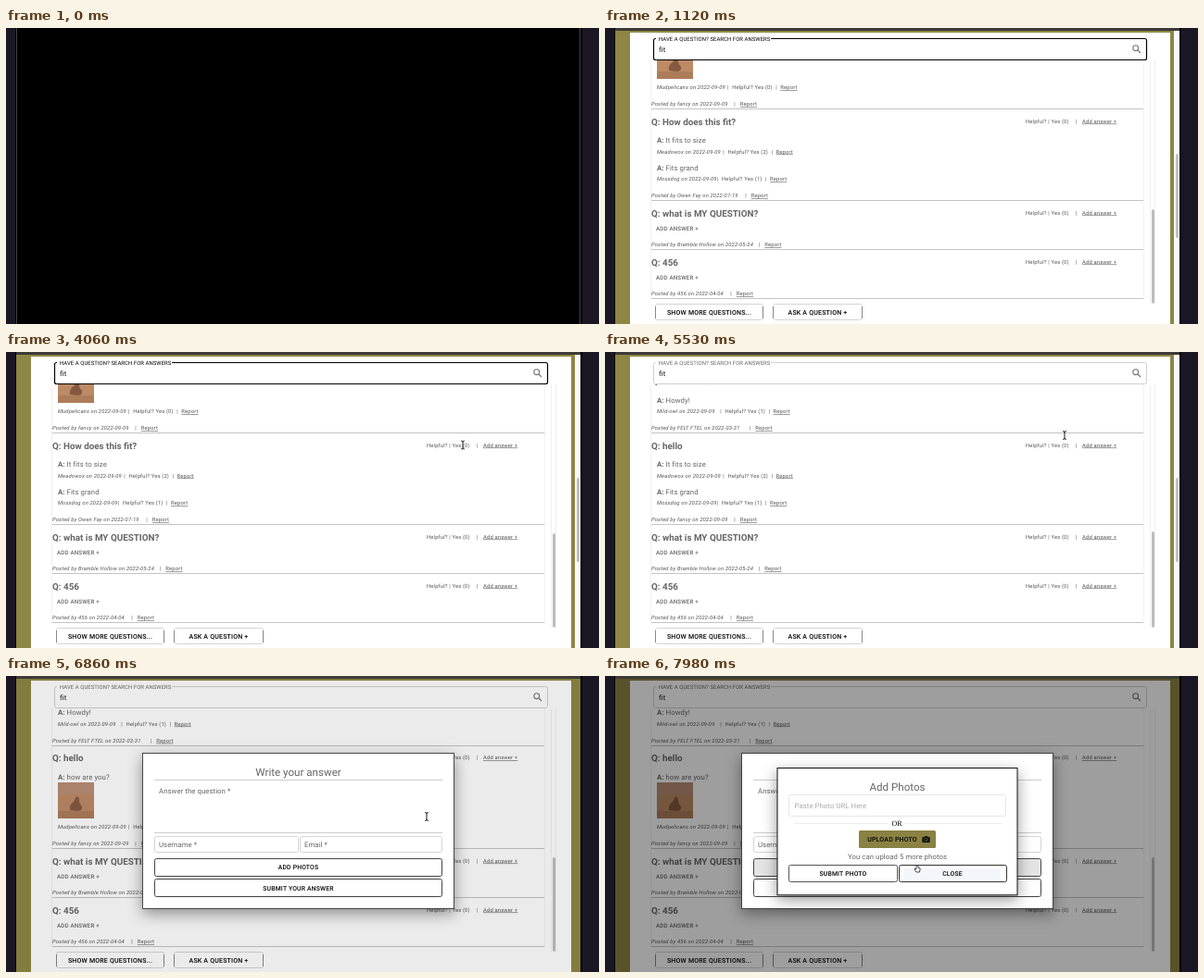
An HTML page for the animation above (8000 ms loop, 640 px wide and 320 px high).

```html
<!DOCTYPE html>
<html lang="en">
<head>
<meta charset="utf-8">
<title>Questions and answers</title>
<style>
html, body { margin: 0; width: 100%; height: 100%; overflow: hidden; background: #000; }
svg { display: block; width: 640px; height: 320px; font-family: Roboto, sans-serif; text-rendering: geometricPrecision; }
text { white-space: pre; }
.title { font: 700 9.84px Roboto, sans-serif; fill: #666; }
.body { font-size: 7.75px; letter-spacing: .0094em; fill: #666; }
.meta { font-size: 5.8px; letter-spacing: .03em; fill: #555; }
.by { font-style: italic; }
.link { text-decoration: underline; }
.small { font-weight: 500; font-size: 6.2px; letter-spacing: .0286em; }
.btn { font-weight: 500; font-size: 7px; letter-spacing: .0286em; }
.act { font-weight: 500; font-size: 6.8px; letter-spacing: .0286em; text-anchor: middle; }
.head { font-size: 11.6px; fill: #666; text-anchor: middle; }
.label { font-size: 5.95px; letter-spacing: .0094em; }
.shadow { filter: drop-shadow(0 5px 8px rgba(0, 0, 0, .4)); }
</style>
</head>
<body>
<svg id="stage" viewBox="0 0 640 320"></svg>
<script>
const text = (x, y, cls, s, extra = '') => `<text x="${x}" y="${y}" class="${cls}" ${extra}>${s}</text>`;
const rect = (x, y, w, h, fill, extra = '') =>
  `<rect x="${x}" y="${y}" width="${w}" height="${h}" fill="${fill}" ${extra}/>`;
const line = (x1, y1, x2, y2, color, w = 1) =>
  `<path d="M${x1} ${y1}L${x2} ${y2}" stroke="${color}" stroke-width="${w}"/>`;
const box = (x, y, w, h, color, sw = 1) =>
  rect(x, y, w, h, 'none', `rx="2" stroke="${color}" stroke-width="${sw}"`);
const pill = (x, w, s) => box(x, 298.5, w, 17, '#d5d5d5') +
  line(x, 301, x, 314, '#888') + line(x + w, 301, x + w, 314, '#888') +
  `<text x="${x + w / 2}" y="309.7" class="btn" text-anchor="middle">${s}</text>`;

function photo(kind, y) {
  if (kind === 'bird') return `<g transform="translate(56 ${y})">` +
    rect(0, 0, 39, 39, '#bd8a66') + rect(0, 0, 39, 13, '#b98d74') + rect(0, 31, 39, 8, '#ad7d5a') +
    '<path d="M13 30Q12 24 17 21L20 15L23 17Q22 22 26 26Q27 30 22 31Z" fill="#85593f"/></g>';
  let s = rect(0, 0, 39, 39, '#29231f');
  for (let i = 0; i < 46; i++) {
    const x = i * 17.3 % 36 + 1, py = i * 10.7 % 34 + 3;
    s += `<circle cx="${x}" cy="${py}" r="${.6 + i % 3 * .3}" fill="${['#8d7953', '#6a5546', '#a8946c'][i % 3]}"/>`;
  }
  return `<g transform="translate(56 ${y})">${s}</g>`;
}

// An answer is [words, author, x of first divider, votes, photo].
const size = ['It fits to size', 'Meadowox', 128, 2];
const grand = ['Fits grand', 'Mossdog', 121.5, 1];
const bird = ['how are you?', 'Mudpelicans', 132.7, 0, 'bird'];
const ask = (title, yes, by, bar, answers = [], more) => ({ title, yes, by, bar, answers, more });
const first = ask('question', 8, 'RelentlessInquirers on 2021-11-29', 186.5,
  [['Good answer', 'Noah Brill', 132.7, 4], ['Depends', 'KD', 107.5, 3]], true);
const genie = ask('Could I get this color if I had a personal genie?', 2, 'Moss on 2022-09-06', 138.5,
  [['Yes you can', 'Trader', 116.5, 1, 'flowers']]);
const cow = ask('cow', 1, 'Moss on 2022-09-05', 138.5);
const felt = ask('FELT FTEL?', 0, 'FELT FTEL on 2022-03-31', 156.5, [['Howdy!', 'Mild-owl', 125, 1]]);
const hello = ask('hello', 0, 'fancy on 2022-09-09', 140, [bird]);
const stale = { ...hello, answers: [size, grand] };
const fits = ask('How does this fit?', 0, 'Owen Fay on 2022-07-19', 152, [size, grand]);
const mine = ask('what is MY QUESTION?', 0, 'Bramble Hollow on 2022-05-24', 166.5);
const digits = ask('456', 0, '456 on 2022-04-04', 136);

function block(q, y) {
  let s = text(50, y + 17.3, 'title', 'Q: ' + q.title) +
    text(454, y + 15, 'meta', `Helpful? | Yes (${q.yes})`) + text(507.5, y + 15, 'meta', '|') +
    text(515, y + 15, 'meta link', 'Add answer +');
  let end = y + 19;
  for (const [words, who, bar, votes, pic] of q.answers) {
    s += text(56, end + 17.6, 'body', `<tspan font-weight="700">A:</tspan> ${words}`);
    if (pic) { s += photo(pic, Math.round(end + 20.5)); end += 42; }
    const m = end + 29;
    s += text(56, m, 'meta by', who + ' on 2022-09-09') + text(bar - .7, m, 'meta', '|') +
      text(bar + 4.5, m, 'meta', `Helpful? Yes (${votes})`) +
      text(bar + 51.6, m, 'meta', '|') + text(bar + 56.6, m, 'meta link', 'Report');
    end += 29.5;
  }
  if (!q.answers.length) s += text(55, y + 32.6, 'small', 'ADD ANSWER +', 'fill="#666"');
  if (q.more) s += text(57, y + 95.8, 'small', 'LOAD MORE ANSWERS...');
  const h = q.answers.length ? end - y + (q.more ? 35.5 : 21) : 53;
  const rule = Math.floor(y + h) + .5;
  s += text(50, y + h - 3.3, 'meta by', 'Posted by ' + q.by) + text(q.bar - .7, y + h - 3.3, 'meta', '|') +
    text(q.bar + 5.8, y + h - 3.3, 'meta link', 'Report') +
    line(50, rule, 581.5, rule, '#c4c4c4') +
    line(49.5, y, 49.5, rule, '#f0f0f0') + line(581.5, y, 581.5, rule, '#f4f4f4');
  return [s, h];
}

// Stacks questions so that the last one ends at the given height.
function stack(list, bottom) {
  const heights = list.map(q => block(q, 0)[1]);
  let y = bottom - heights.reduce((a, b) => a + b, 0);
  const top = y;
  const art = list.map((q, i) => { const s = block(q, y)[0]; y += heights[i]; return s; }).join('');
  return { art, top };
}
const BOTTOM = 292.5;
const all = stack([first, genie, cow, felt, hello, fits, mine, digits], BOTTOM);
const sorted = stack([felt, stale, mine, digits], BOTTOM);
const loaded = stack([felt, hello, mine, digits], BOTTOM);
const START = Math.round(35 - all.top);

const field = (id, color, width, ink) => `<g id="${id}">
  <path d="M55 11.5H54.5Q52.5 11.5 52.5 13.5V32.5Q52.5 34.5 54.5 34.5H582.5Q584.5 34.5 584.5 32.5V13.5Q584.5 11.5 582.5 11.5H179"
    fill="none" stroke="${color}" stroke-width="${width}"/>` +
  text(58, 13.7, 'label', 'HAVE A QUESTION? SEARCH FOR ANSWERS', `fill="${ink}"`) + '</g>';

const answerForm = rect(147.5, 83.5, 336, 168, '#fff', 'stroke="#222" stroke-width=".8" class="shadow"') +
  text(315.5, 108.3, 'head', 'Write your answer') +
  line(160, 112.5, 471, 112.5, '#ccc') + line(160, 169.5, 471, 169.5, '#ccc') +
  text(165, 126.8, 'body', 'Answer the question *') +
  box(160.5, 173.5, 155, 17, '#d4d4d4') + text(165, 185, 'body', 'Username *') +
  box(317.5, 173.5, 153, 17, '#d4d4d4') + text(322, 185, 'body', 'Email *') +
  `<g id="addPhotos">${box(160.5, 197.5, 310, 19, '#444')}</g>` + text(315.5, 209.2, 'act', 'ADD PHOTOS') +
  box(160.5, 219.5, 310, 19, '#444') + text(315.5, 231.6, 'act', 'SUBMIT YOUR ANSWER');

const photoForm = rect(186, 99.5, 259, 137.3, '#fff', 'stroke="#111" stroke-width="1" class="shadow"') +
  text(315.5, 124, 'head', 'Add Photos') +
  box(198.5, 128.5, 234, 23, '#e6e6e6') + text(204.5, 143, 'body', 'Paste Photo URL Here', 'style="fill:#aaa"') +
  line(204, 159.5, 306, 159.5, '#eee') + line(324, 159.5, 428, 159.5, '#eee') +
  text(315, 162.3, '', 'OR', 'style="font:8px Liberation Serif,serif" text-anchor="middle"') +
  rect(274, 167, 83, 19, '#8a8143', 'rx="1.5"') + text(310, 179, 'btn', 'UPLOAD PHOTO', 'text-anchor="middle"') +
  '<path d="M342.5 174.3H344.5L345.4 173.2H347.8L348.7 174.3H350.5V180H342.5Z"/>' +
  '<circle cx="346.5" cy="177" r="1.7" fill="none" stroke="#8a8143" stroke-width=".8"/>' +
  text(315.5, 198, 'body', 'You can upload 5 more photos', 'text-anchor="middle"') +
  box(198.5, 204.5, 117, 18, '#555') + text(257, 216, 'act', 'SUBMIT PHOTO') +
  box(317.5, 204.5, 116, 18, '#333') + rect(322, 208, 105, 12, '#f3f7fb', 'id="hover"') +
  text(375, 216, 'act', 'CLOSE');

const stage = document.getElementById('stage');
stage.innerHTML = `<clipPath id="view"><rect x="48" y="35" width="548" height="263"/></clipPath>` +
  rect(0, 0, 640, 320, '#000') + rect(0, 0, 10, 320, '#1a1623') + rect(622, 0, 18, 320, '#1a1623') +
  line(11.5, 0, 11.5, 320, '#444') + line(619.5, 0, 619.5, 320, '#444') +
  '<g id="page">' + rect(11, 0, 609, 3, '#3d3a38') + rect(11, 3, 609, 317, '#8d8644') +
  rect(27, 5, 583, 315, '#fff') +
  '<g id="bar">' + rect(614, 3, 6, 317, '#fafafa') + rect(616, 136, 3, 91, '#c1c1c1', 'rx="1.5"') + '</g>' +
  '<g clip-path="url(#view)">' +
  `<g id="all">${all.art}</g><g id="sorted">${sorted.art}</g><g id="loaded">${loaded.art}</g>` +
  line(588.5, 35, 588.5, 298, '#f0f0f0') + line(593.5, 35, 593.5, 298, '#f0f0f0') + '</g>' +
  rect(590, 36, 3, 102, '#bdbdbd', 'rx="1.5" id="thumb"') +
  field('focus', '#000', 1.2, '#000') + field('blur', '#d0d0d0', 1, '#666') +
  '<text id="query" x="58" y="26" class="body" style="fill:#111"></text>' + rect(64.4, 18, .8, 9.5, '#000', 'id="caret"') +
  '<path d="M575 24L578 27" stroke="#777" stroke-width="1.3"/><circle cx="572.7" cy="21.7" r="2.9" fill="none" stroke="#777" stroke-width="1.1"/>' +
  pill(54.5, 116, 'SHOW MORE QUESTIONS...') + pill(181.5, 96, 'ASK A QUESTION +') +
  rect(11, 3, 609, 317, '#000', 'id="shade"') +
  `<g id="form">${answerForm}</g><g id="photos">${photoForm}</g><g id="mouse">` +
  '<path id="beam" d="M-1.8 -4.5Q0 -4.5 0 -3Q0 -4.5 1.8 -4.5M0 -3V3M-1.8 4.5Q0 4.5 0 3Q0 4.5 1.8 4.5" fill="none" stroke="#000" stroke-width=".9"/>' +
  '<path id="arrow" d="M0 0V8.5L2 6.7L3.4 9.8L4.7 9.2L3.4 6.2H6Z" stroke="#fff" stroke-width=".5"/>' +
  '<path id="hand" d="M-1 -3V1L-2.5 0L-3 1L-1 4H2.5L3.2 0L1 -.8V-3Q0 -4 -1 -3Z" fill="#fff" stroke="#000" stroke-width=".7"/>' +
  '</g></g>';

const el = {};
stage.querySelectorAll('[id]').forEach(n => el[n.id] = n);
const show = (id, on) => el[id].setAttribute('visibility', on ? 'inherit' : 'hidden');
const clamp = v => Math.max(0, Math.min(1, v));

// Pointer path: time, x, y
const path = [[2730, 73, 31], [3080, 73, 31], [3300, 235, 52], [3550, 480, 84], [3700, 563, 97], [3850, 497, 99],
  [4060, 493, 100.5], [5460, 493, 100.5], [5530, 496, 90], [5950, 533, 89], [6720, 533, 89], [6860, 454, 152],
  [7210, 316, 207], [7700, 316, 207], [7980, 337, 208]];
function pointer(t) {
  const i = path.findIndex(p => p[0] > t);
  if (i < 1) return path[i ? path.length - 1 : 0].slice(1);
  const [a, b] = [path[i - 1], path[i]], k = (t - a[0]) / (b[0] - a[0]);
  return [a[1] + (b[1] - a[1]) * k, a[2] + (b[2] - a[2]) * k];
}

function draw(ms) {
  const t = Math.floor(ms / 70) * 70;
  show('page', t >= 70);

  el.query.textContent = 'fit'.slice(0, t < 280 ? 1 : t < 420 ? 2 : 3);
  el.caret.setAttribute('x', t < 280 ? 60.4 : t < 420 ? 62.3 : 64.4);
  show('caret', t < 840 || t < 3360 && Math.floor(t / 420) % 2);
  show('focus', t < 4270);
  show('blur', t >= 4270);

  const k = clamp((t - 630) / 350), scroll = k * k * (3 - 2 * k);
  el.all.setAttribute('transform', `translate(0 ${START * (1 - scroll)})`);
  show('all', t < 4970);
  show('sorted', t >= 4970 && t < 5600);
  show('loaded', t >= 5600);
  const short = t >= 4970 && t < 5600 ? 2 : 0;
  el.thumb.setAttribute('y', 36 + 160 * scroll - short);
  el.thumb.setAttribute('height', 101.7 + short);

  const a = clamp((t - 6160) / 280), b = clamp((t - 7280) / 280);
  show('bar', t < 6230);
  el.shade.setAttribute('opacity', .08 * a + .3 * b);
  el.form.setAttribute('opacity', a);
  el.photos.setAttribute('opacity', b);
  el.addPhotos.firstChild.setAttribute('fill', t >= 7140 ? '#e4e4e4' : 'none');
  show('hover', t >= 7840);

  const [x, y] = pointer(t);
  const hand = t >= 5880 && t < 6230 || t >= 7140;
  const beam = t < 3220 || t >= 3780 && t < 5600 || t >= 6860 && t < 7000;
  el.mouse.setAttribute('transform', `translate(${x} ${y})`);
  show('mouse', t >= 2730);
  show('hand', hand);
  show('beam', beam && !hand);
  show('arrow', !beam && !hand);
}

const begin = performance.now();
function tick() {
  draw((performance.now() - begin) % 8000);
  requestAnimationFrame(tick);
}
tick();
</script>
</body>
</html>
```
